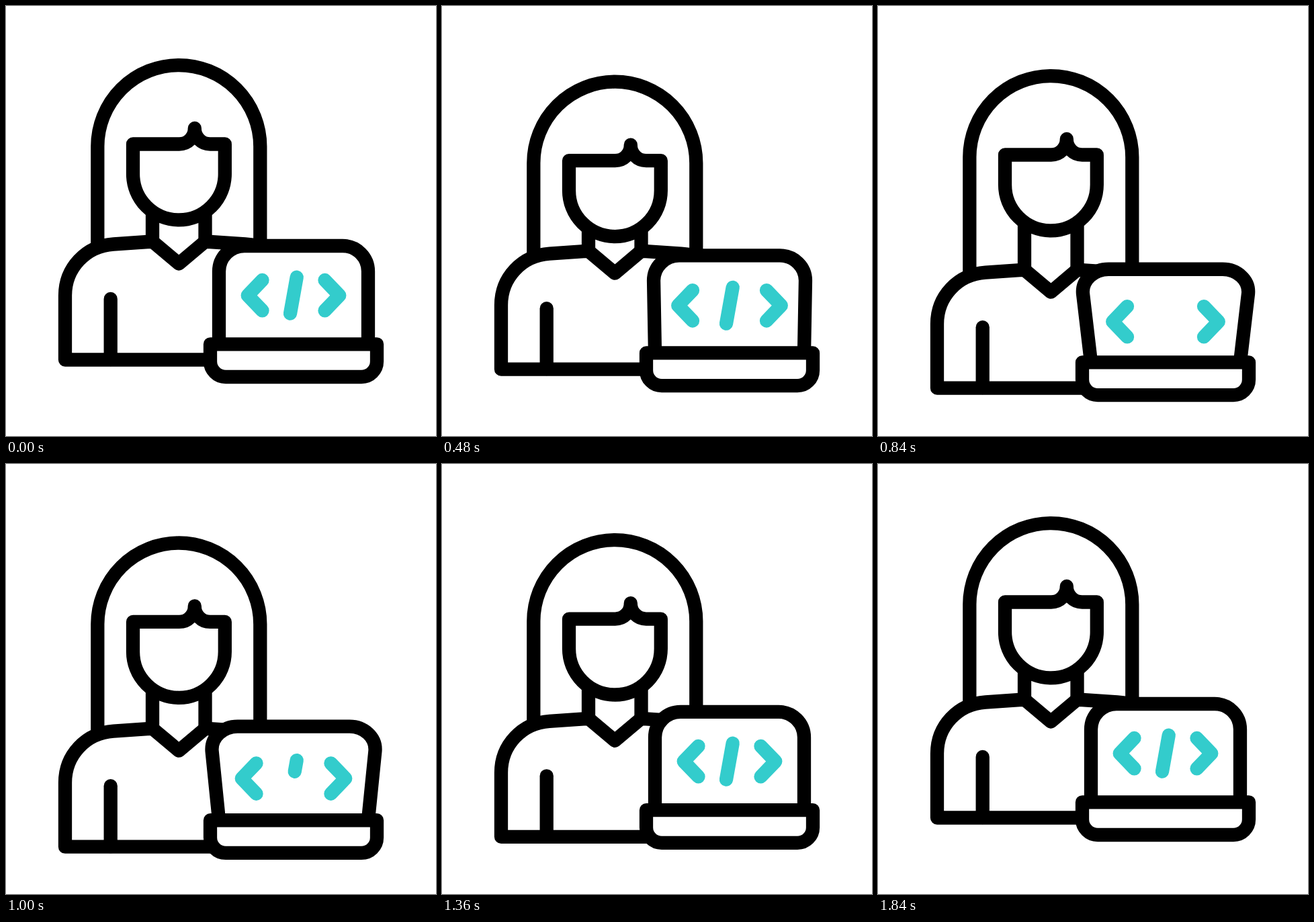
An HTML page for the animation above (2000 ms loop, 640 by 640 pixels).

```html
<!DOCTYPE html>
<html lang="en">
<head>
<meta charset="utf-8">
<title>Programmer icon</title>
<style>
html, body { margin: 0; width: 100%; height: 100%; overflow: hidden; background: #fff; }
svg { display: block; width: 100%; height: 100%; }
</style>
</head>
<body>
<svg viewBox="0 0 640 640" fill="#fff" stroke="#000" stroke-width="20.3" stroke-linejoin="round">
  <path id="hair"/>
  <path id="neck"/>
  <g id="torso" stroke-linecap="round">
    <path d="M320 526.5H88V431C88 390 119 357 160 354.5L218 350.5L257.3 383.5L296.5 350.5L356 354.5Q370 355.5 377 358"/>
    <path d="M155.7 436V526"/>
  </g>
  <path id="face" d="M280.8 182A23 23 0 0 1 257.8 205.5H189V250A68.4 68.4 0 0 0 325.8 250V205.5H303.8A23 23 0 0 1 280.8 182Z"/>
  <g id="laptop">
    <path id="screen"/>
    <path d="M304 503.3H552V529a23 23 0 0 1-23 23H327a23 23 0 0 1-23-23Z"/>
  </g>
  <g id="code" fill="none" stroke="#33cccc" stroke-linecap="round">
    <path id="left" d="M381.5 408L359.7 430.7L381.5 453.4"/>
    <path id="slash"/>
    <path id="right" d="M474.5 408L496.3 430.7L474.5 453.4"/>
  </g>
</svg>
<script>
const LOOP = 2000, STEP = 40;
const el = id => document.getElementById(id);
const set = (id, d) => el(id).setAttribute("d", d);
const move = (id, x, y) => el(id).setAttribute("transform", `translate(${x} ${y})`);

// Symmetric cubic-bezier(.5, 0, .5, 1), solved by bisection.
function ease(x) {
  if (x <= 0) return 0;
  if (x >= 1) return 1;
  let lo = 0, hi = 1;
  for (let i = 0; i < 20; i++) {
    const s = (lo + hi) / 2;
    if (1.5 * s * (1 - s) + s ** 3 < x) lo = s; else hi = s;
  }
  return lo * lo * (3 - 2 * lo);
}

// Keys are [time, value] pairs.
function track(t, keys) {
  let value = keys[0][1];
  for (let i = 1; i < keys.length; i++) {
    const [t0, v0] = keys[i - 1], [t1, v1] = keys[i];
    if (t >= t0) value = v0 + (v1 - v0) * ease((t - t0) / (t1 - t0));
  }
  return value;
}

// Down and back up, with a hold between the two moves.
const dip = (t, depth, a, b, c, d) => track(t, [[a, 0], [b, depth], [c, depth], [d, 0]]);

function screenPath(tilt) {
  const top = 357 + tilt * 0.64, side = top + 38 - tilt * 0.12;
  const l = 317 - tilt, r = 539 + tilt, bend = tilt * 0.16;
  return `M317 503L${l} ${side}C${l - bend} ${side - 21} ${l + 17} ${top} ${l + 38} ${top}` +
    `H${r - 38}C${r - 17} ${top} ${r + bend} ${side - 21} ${r} ${side}L539 503`;
}

function draw(t) {
  const head = track(t, [[75, 0], [625, 28], [840, 16], [1085, 33.3], [1845, 0]]);
  const body = dip(t, 43.2, 160, 940, 1030, 1815);
  const base = dip(t, 27.3, 70, 905, 925, 1743);
  const tilt = dip(t, 12, 320, 850, 890, 1288);
  const spread = dip(t, 10.5, 40, 690, 880, 1294);
  const hidden = dip(t, 1, 470, 740, 900, 1150);

  set("hair", `M136.3 ${362 + body}V${209 + head}A121 121 0 0 1 378.3 ${209 + head}V${362 + body}`);
  set("neck", `M218 ${350 + body}V${305 + head}H296.5V${350 + body}`);
  move("torso", 0, body);
  move("face", 0, head);
  move("laptop", 0, base);
  set("screen", screenPath(tilt));
  move("code", 0, base + tilt);
  move("left", -spread, 0);
  move("right", spread, 0);
  const shown = 1 - hidden;
  set("slash", `M432.7 403.7L${432.7 - 9.7 * shown} ${403.7 + 54 * shown}`);
  el("slash").setAttribute("visibility", shown > 0.01 ? "visible" : "hidden");
}

const start = performance.now();
function tick() {
  const t = (performance.now() - start) % LOOP;
  draw(Math.floor(t / STEP) * STEP);
  requestAnimationFrame(tick);
}
tick();
</script>
</body>
</html>
```
